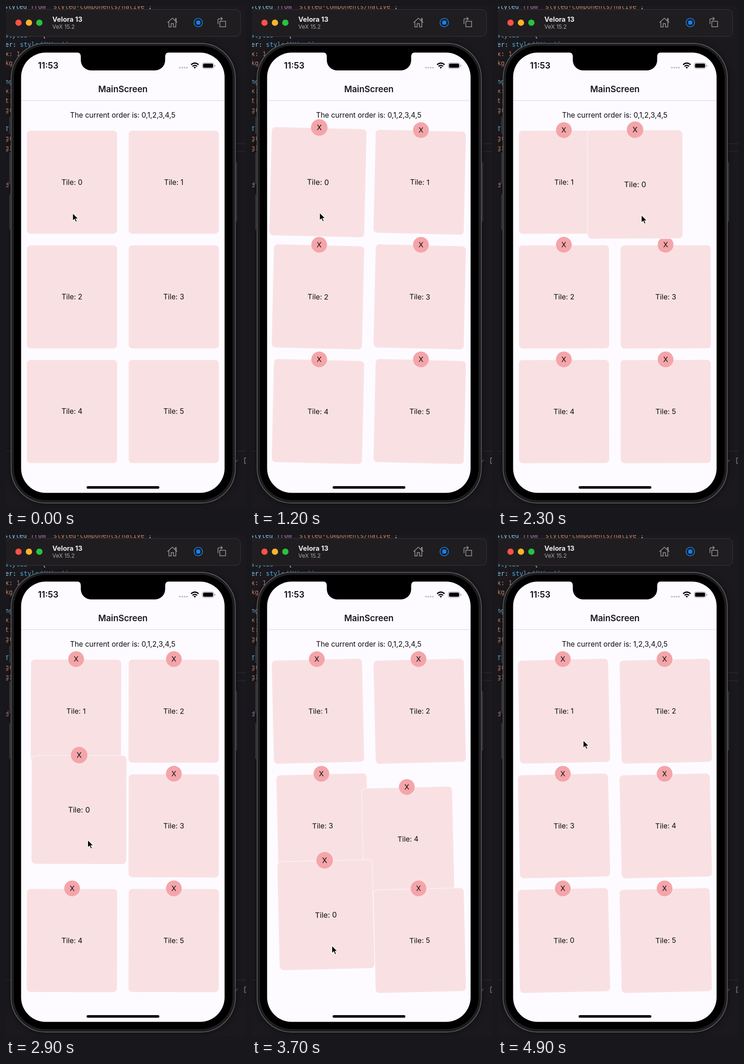
Recreate the animation shown at these times as an HTML page. Size 518 by 1081 pixels, loop 5 s.

```html
<!DOCTYPE html>
<html lang="en">
<head>
<meta charset="utf-8">
<title>Reorderable tiles</title>
<style>
  html, body { margin: 0; width: 100%; height: 100%; overflow: hidden; background: #19171b; }
  svg { display: block; width: 518px; height: 1081px; font-family: Inter, "Open Sans", sans-serif; }
  .code { font: 13.6px "DejaVu Sans Mono", monospace; white-space: pre; }
  .mid { text-anchor: middle; }
  .body { font-size: 15.5px; fill: #0b0a0c; }
  .tile rect { fill: #f9e1e3; stroke: #fdfbff; stroke-width: 1.6; paint-order: stroke; }
  .icon { fill: none; stroke: #98969a; stroke-width: 1.5; }
</style>
</head>
<body>
<svg viewBox="0 0 518 1081">
  <defs>
    <filter id="blur" x="-20%" y="-10%" width="140%" height="120%"><feGaussianBlur stdDeviation="9"/></filter>
  </defs>

  <!-- editor behind the simulator -->
  <rect width="518" height="1081" fill="#1b191d"/>
  <g id="code" class="code"></g>
  <path d="M490 297H518M490 314H518M0 960.5H518" stroke="#302e32" fill="none"/>
  <path d="M496 984l4-5M518 975h-3v12h3" stroke="#aaa8ac" fill="none"/>

  <!-- simulator toolbar -->
  <rect x="-1" y="7.5" width="507" height="58" rx="10" fill="#1f1d20" stroke="#39373a"/>
  <circle cx="27" cy="36" r="6.8" fill="#ff5147"/>
  <circle cx="49.5" cy="36" r="6.8" fill="#fdb32b"/>
  <circle cx="72" cy="36" r="6.8" fill="#28c33e"/>
  <text x="100" y="34" font-size="14.6" font-weight="700" fill="#f1eff2">Velora 13</text>
  <text x="100" y="49.3" font-size="12" fill="#a9a7ab">VeX 15.2</text>
  <g class="icon">
    <path d="M348.5 36L359 26.3L369.5 36M351.5 34V45.2H356.5V38H361.5V45.2H366.5V34M365.5 32V27H367.5V34"/>
    <path d="M461.5 33h12.5v11.8h-12.5zM457.5 39v-9.5q0-2 2-2h7M463.5 24l3.5 3.5l-3.5 3.5"/>
    <g stroke="#1482f7"><circle cx="415" cy="35.7" r="9.2"/><rect x="411.5" y="32.2" width="7" height="7" rx="1" fill="#1482f7"/></g>
  </g>

  <!-- phone body -->
  <rect x="12" y="84" width="482" height="988" rx="75" fill="#000" opacity=".6" filter="url(#blur)"/>
  <path d="M8 239V276M8 316V385M8 406V483M497.5 337V465" stroke="#363438" stroke-width="2.4"/>
  <rect x="11" y="80.5" width="484" height="992" rx="75" fill="#1d1c1e" stroke="#68666a" stroke-width="1.4"/>
  <rect x="17" y="86" width="472" height="980" rx="69" fill="#000"/>
  <rect x="32.6" y="100.6" width="439.2" height="949.9" rx="53" fill="#fdfbff"/>
  <path d="M154 100Q161.5 101 161.5 109V117A22 22 0 0 0 183.5 139H321.5A22 22 0 0 0 343.5 117V109Q343.5 101 351 100Z" fill="#000"/>

  <!-- status bar and header -->
  <text x="69" y="135" font-size="18.3" font-weight="600" fill="#0b0a0c">11:53</text>
  <g fill="#c6c4c9"><circle cx="375.3" cy="133" r="2"/><circle cx="380.5" cy="133" r="2"/><circle cx="385.5" cy="133" r="2"/><circle cx="390.5" cy="133" r="2"/></g>
  <g fill="none" stroke="#000" stroke-width="2.6">
    <path d="M399.5 126.8Q407.5 119.6 415.6 126.8M402.6 130.2Q407.5 125.8 412.5 130.2"/>
    <path d="M407.5 135.3L404.9 132.3Q407.5 130.3 410.1 132.3Z" fill="#000" stroke="none"/>
  </g>
  <rect x="423.6" y="122.6" width="25" height="12.4" rx="4" fill="none" stroke="#9c9a9e"/>
  <rect x="425.3" y="124.3" width="21.6" height="9" rx="2.5"/>
  <path d="M450 127v4q2-.6 2-2t-2-2" fill="#9c9a9e"/>
  <text class="mid" x="252.3" y="185.5" font-size="18.5" font-weight="600" fill="#17161a">MainScreen</text>
  <path d="M33 204H471.5" stroke="#d6d4d9" stroke-width="1.2"/>
  <text class="mid body" id="order" x="252" y="241.2"></text>

  <g id="tiles"></g>
  <rect x="174" y="1036" width="157" height="5.6" rx="2.8"/>
  <path id="cursor" d="M0 0V16.5L3.9 13L6.6 19L9.3 17.8L6.7 12H12Z" fill="#000" stroke="#fff" stroke-width="1.1"/>
</svg>

<script>
const LOOP = 5000, STEP = 100;
const EDIT_AT = 500, WIGGLE_AT = 534, DROP_AT = 4100;
const $ = id => document.getElementById(id);

function add(parent, name, attrs, text) {
  const el = document.createElementNS("http://www.w3.org/2000/svg", name);
  for (const key in attrs) el.setAttribute(key, attrs[key]);
  if (text) el.textContent = text;
  return parent.appendChild(el);
}

const BLUE = "#86cdf4", CYAN = "#4fb4e6", ORANGE = "#c98567", MAUVE = "#b880b4", PLAIN = "#c9c7cb";
[[-4, 6, "styled", BLUE], [53, 6, "from", MAUVE], [94, 6, "'styled-components/native'", ORANGE], [307, 6, ";", PLAIN],
 [-3, 68, "styles", CYAN], [62, 68, "= {", PLAIN],
 [-2, 88, "er:", BLUE], [30, 88, "styled(View)`", CYAN], [-2, 108, "x: 1", ORANGE], [-2, 128, "kg", ORANGE],
 [-2, 168, "ng", BLUE], [-2, 188, "x:", ORANGE], [-2, 209, "t:", ORANGE], [-2, 229, "gr", ORANGE],
 [-2, 270, "T", CYAN], [-2, 290, "gr", ORANGE], [-2, 311, "gi", ORANGE], [-2, 391, "d", MAUVE]
].forEach(([x, y, text, fill]) => add($("code"), "text", { x, y, fill }, text));

const slot = n => [142.4 + n % 2 * 219.6, 380.2 + (n >> 1) * 247.4];
const smooth = p => p < .5 ? 2 * p * p : 1 - 2 * (1 - p) ** 2;

// Tracks hold [time, x, y] stops.
function along(track, t, ease = p => p) {
  const i = track.findIndex(stop => stop[0] > t);
  if (i < 0) return track[track.length - 1].slice(1);
  if (i === 0) return track[0].slice(1);
  const a = track[i - 1], b = track[i];
  const p = ease((t - a[0]) / (b[0] - a[0]));
  return [a[1] + (b[1] - a[1]) * p, a[2] + (b[2] - a[2]) * p];
}

const slide = (from, to, start) => [[start, ...slot(from)], [start + 300, ...slot(to)]];
// A tile that starts to make room again, then returns to its slot.
const nudge = (n, start, peak) => {
  const [x, y] = slot(n);
  return [[start, x, y], [start + 150, x + peak, y], [start + 450, x, y]];
};

const tracks = [
  [[1400, ...slot(0)], [1700, 205, 382], [2000, 290, 385], [2300, 296, 385], [2500, 228, 455],
   [2700, 142, 580], [2900, 157.6, 593], [3100, 285, 612], [3300, 363, 626], [3400, 348, 665],
   [3550, 215, 790], [3700, 159.5, 820], [4000, 150, 832], [DROP_AT, 149, 834], [4300, 142.1, 876.3], [4400, ...slot(4)]],
  [...slide(1, 0, 1800), ...nudge(0, 2520, 80)],
  slide(2, 1, 2560),
  [...slide(3, 2, 3020), ...nudge(2, 3330, 70)],
  slide(4, 3, 3472),
  [[0, ...slot(5)]]
];

const cursorTrack = [
  [0, 144, 447], [1200, 146, 446], [1400, 148, 446], [1700, 217, 448], [2000, 305, 451], [2300, 309.5, 451],
  [2500, 240, 521], [2700, 152, 646], [2900, 176.5, 658], [3100, 303, 678], [3300, 378, 692], [3400, 360, 731],
  [3550, 227, 856], [3700, 172.5, 886], [4000, 164, 898], [DROP_AT, 166, 895], [4300, 205, 719], [4600, 195, 560], [4900, 184, 443]
];

const tiles = [];
for (const n of [1, 2, 3, 4, 5, 0]) {
  const group = add($("tiles"), "g", { class: "tile" });
  add(group, "rect", { x: -97.4, y: -111.2, width: 194.8, height: 222.4, rx: 8 });
  add(group, "text", { class: "mid body", y: 5.4 }, "Tile: " + n);
  const badge = add(group, "g", { transform: "translate(0 -112.5)" });
  add(badge, "circle", { r: 17, fill: "#f4a5a9" });
  add(badge, "text", { class: "mid body", y: 5.4 }, "X");
  tiles[n] = { group, badge };
}

const ramp = (t, start, length) => Math.min(1, Math.max(0, (t - start) / length));

function draw(t) {
  const tilt = t < WIGGLE_AT ? 0 : 1.33 * Math.sin(1.22 * (t - 2600) * Math.PI / 180);
  const lift = 1 + .05 * (smooth(ramp(t, EDIT_AT - 60, 250)) - smooth(ramp(t, DROP_AT - 60, 250)));
  tiles.forEach(({ group, badge }, n) => {
    const [x, y] = along(tracks[n], t, n ? smooth : undefined);
    group.setAttribute("transform", `translate(${x} ${y}) rotate(${tilt}) scale(${n ? 1 : lift})`);
    badge.style.display = t < EDIT_AT ? "none" : "";
  });
  $("order").textContent = "The current order is: " + (t < DROP_AT ? "0,1,2,3,4,5" : "1,2,3,4,0,5");
  $("cursor").setAttribute("transform", `translate(${along(cursorTrack, t).join(" ")})`);
}

const begin = performance.now();
function tick() {
  const t = (performance.now() - begin) % LOOP;
  draw(Math.floor(t / STEP) * STEP);
  requestAnimationFrame(tick);
}
tick();
</script>
</body>
</html>
```
